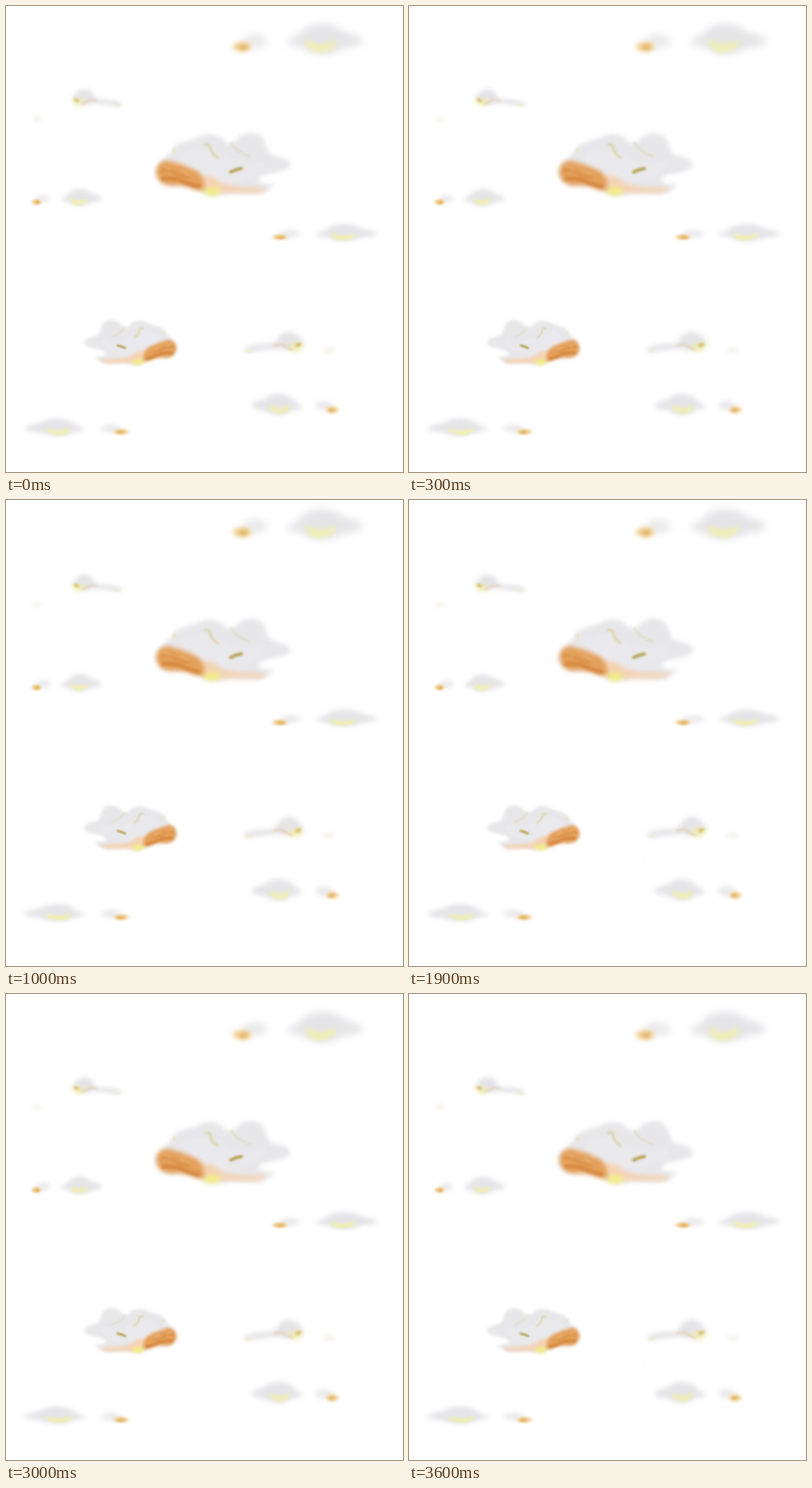
These frames come from a looping animation (555x651 px, 4000 ms). An HTML page:

```html
<!DOCTYPE html>
<html lang="en">
<head>
<meta charset="utf-8">
<title>Drifting clouds</title>
<style>
  html, body { margin: 0; height: 100%; overflow: hidden; background: #fff; }
  svg { display: block; width: 555px; height: 651px; }
  filter { color-interpolation-filters: sRGB; }
  .stroke { fill: none; stroke-linecap: round; stroke-linejoin: round; }
</style>
</head>
<body>
<svg viewBox="0 0 555 651">
  <defs>
    <filter id="soft" x="-50%" y="-50%" width="200%" height="200%"><feGaussianBlur stdDeviation="5.5"/></filter>
    <filter id="mid" x="-50%" y="-50%" width="200%" height="200%"><feGaussianBlur stdDeviation="3"/></filter>
    <filter id="fine" x="-50%" y="-50%" width="200%" height="200%"><feGaussianBlur stdDeviation="1.4"/></filter>

    <!-- large cloud, 188 x 88 -->
    <g id="large">
      <path filter="url(#mid)" fill="#e7e7ea" d="M1 54C3 39 18 33 24 22C30 11 46 11 58 6C68-1 88-1 95 9C100 15 108 15 114 8C122-2 140-3 148 4C155 11 154 24 162 30C172 33 190 35 188 45C184 55 160 54 148 60C138 66 146 72 166 70C163 79 150 84 139 85L104 83C94 88 74 88 65 82C53 73 39 74 24 73C8 72 0 64 1 54Z"/>
      <g filter="url(#mid)">
        <path fill="#ececef" d="M37 30Q64 12 91 30T148 36Q162 43 141 57T83 66T35 38Z" opacity=".6"/>
        <path fill="#f4d3b4" d="M58 62Q70 55 86 63Q90 76 154 76Q154 83 139 83L80 83Z"/>
        <path fill="#e4a05a" d="M1 54Q2 39 17 38L38 44Q45 47 57 52Q69 59 69 80L56 79Q39 70 23 73Q3 72 1 54Z"/>
        <ellipse cx="79" cy="81" rx="12" ry="6" fill="#f2ec86"/>
      </g>
      <g class="stroke" filter="url(#fine)">
        <path stroke="#cf7e34" stroke-width="6" d="M11 63Q28 62 38 67T60 74" opacity=".6"/>
        <path stroke="#d58a40" stroke-width="5" d="M9 52Q17 48 25 54T45 61" opacity=".5"/>
        <path stroke="#efb87a" stroke-width="3" d="M12 46L21 50M36 52L46 57" opacity=".6"/>
        <path stroke="#d8cf9c" stroke-width="3.5" d="M69 16Q76 13 77 22Q79 29 87 34" opacity=".8"/>
        <path stroke="#ddd7b5" stroke-width="2.5" d="M106 13Q113 26 132 32" opacity=".8"/>
        <path stroke="#b9a558" stroke-width="4.5" d="M105 54Q113 50 120 49"/>
        <path stroke="#ebdfa8" stroke-width="3" d="M26 22L27 26"/>
      </g>
    </g>

    <!-- puff with a small companion, 186 x 46 -->
    <g id="pair">
      <g filter="url(#soft)" fill="#e5e5e8">
        <path d="M78 25Q94 19 101 9Q114 0 128 1Q147 0 158 12Q186 17 185 26Q182 33 160 34Q144 44 126 43Q108 43 100 34Q78 32 78 25Z"/>
        <ellipse cx="34" cy="25" rx="18" ry="10" opacity=".8"/>
      </g>
      <g filter="url(#mid)">
        <path fill="#eeeeb4" d="M105 24Q112 22 115 28Q130 31 138 27Q145 18 147 31Q137 41 122 41Q105 38 105 24Z"/>
        <ellipse cx="16" cy="33" rx="13" ry="7" fill="#f0d199"/>
        <ellipse cx="18" cy="34" rx="6" ry="4.5" fill="#e2b25f"/>
      </g>
    </g>

    <!-- small wisp, 73 x 25, centred on its puff -->
    <g id="wisp">
      <g filter="url(#mid)">
        <path fill="#e4e4e7" d="M-18 5Q-12-10 1-11Q12-10 17 3Q46 3 55 10Q48 15 34 11L13 9Q-3 15-18 5Z"/>
        <path fill="#eeebb0" d="M-18 3Q-6 2 3 6Q-2 14-11 12Z"/>
      </g>
      <g class="stroke" filter="url(#fine)">
        <path stroke="#dcc070" stroke-width="4" d="M-12 4L-9 5"/>
        <path stroke="#e4cbad" stroke-width="2.5" d="M-3 10Q4 8 8 4L18 5" opacity=".7"/>
        <path stroke="#efe8c8" stroke-width="2.5" d="M45 11L50 12"/>
      </g>
    </g>
  </defs>

  <g id="sky">
    <use href="#large" transform="translate(209 178)"/>
    <use href="#large" transform="translate(239 439) scale(-.69 .72)"/>
    <use href="#pair" transform="translate(314 24)"/>
    <use href="#pair" transform="translate(370 304) scale(.8 .57)"/>
    <use href="#pair" transform="translate(174 576) scale(-.8 .57)"/>
    <use href="#pair" transform="translate(34 255) scale(.54 .57)"/>
    <use href="#pair" transform="translate(467 541) scale(-.67 .7)"/>
    <use href="#wisp" transform="translate(109 127)"/>
    <use href="#wisp" transform="translate(396 468) scale(-1.2 1.2)"/>
    <g filter="url(#mid)" fill="#f1eee0">
      <ellipse cx="43" cy="158" rx="6" ry="3"/>
      <ellipse cx="452" cy="481" rx="9" ry="3"/>
      <circle cx="328" cy="517" r="1.5"/>
    </g>
  </g>
</svg>
<script>
  const sky = document.getElementById("sky");
  const LOOP = 4000, STEP = 6;

  // Two hard steps up, a rest, then two hard steps down.
  function lift(t) {
    return [500, 1000].filter(at => t >= at).length
         - [2500, 3000].filter(at => t >= at).length;
  }

  function draw() {
    const y = -STEP * lift(performance.now() % LOOP);
    sky.setAttribute("transform", `translate(0 ${y})`);
    requestAnimationFrame(draw);
  }
  draw();
</script>
</body>
</html>
```
